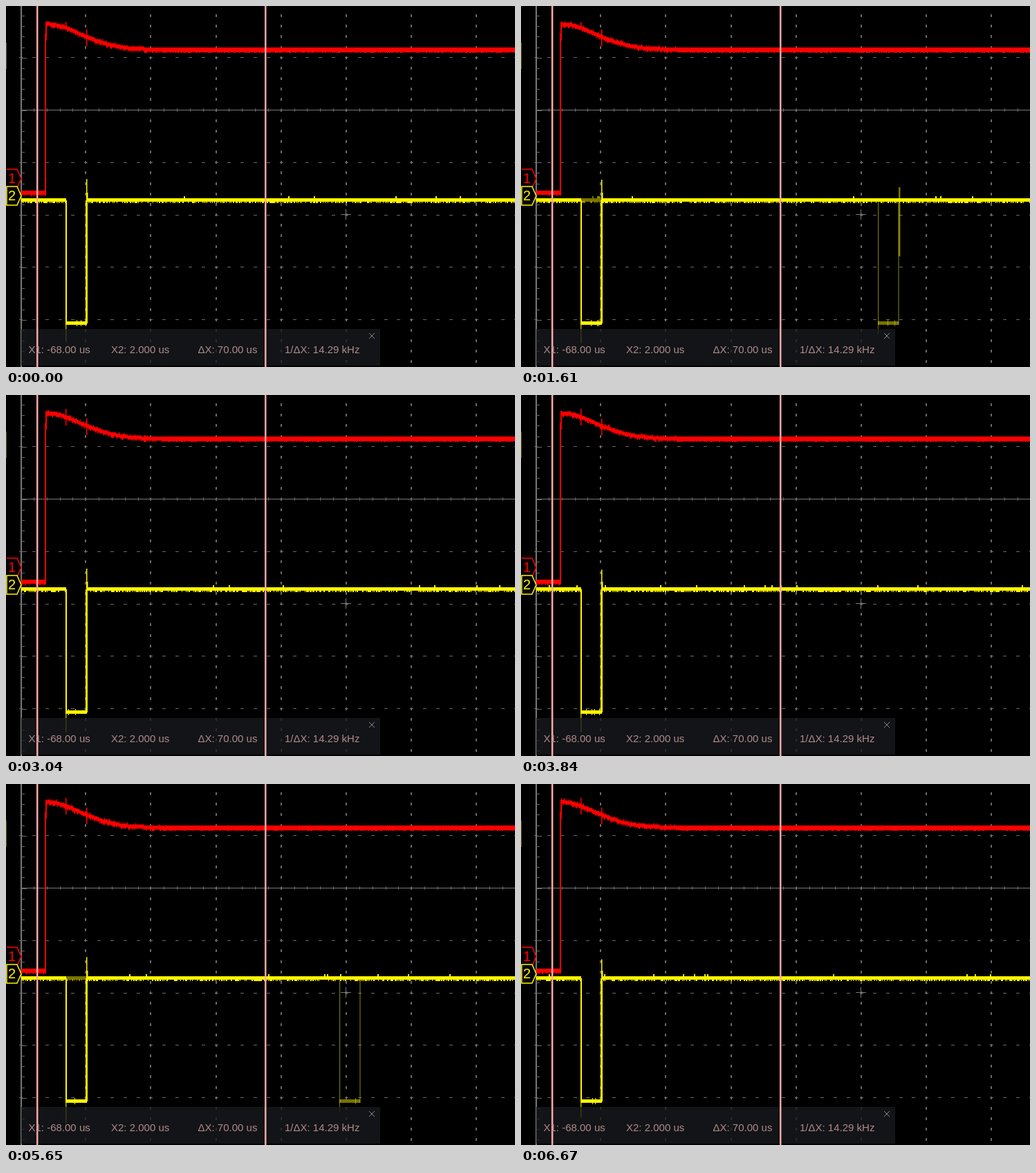
Write an HTML page with a canvas that moves like this. It is 736 px wide and 522 px high and loops after 6870 ms.

```html
<!DOCTYPE html>
<html>
<head>
<meta charset="utf-8">
<style>
  html, body { margin: 0; width: 100%; height: 100%; overflow: hidden; background: #000; }
  canvas { display: block; }
</style>
</head>
<body>
<canvas id="scope" width="736" height="522"></canvas>
<script>
const ctx = document.getElementById('scope').getContext('2d');
const W = 736, H = 522, LOOP = 6870, STEPS = 34;
const RED = '#ff0000', YELLOW = '#fff500', GRID = '#686868';
const LEFT = 22, DIV_X = 94.2, MID_Y = 150.5, DIV_Y = 75.8;

// Stray triggers: first step, left edge, width and optional overshoot
const strays = [
  { at: 5, x: 516, w: 30, spike: true },
  { at: 9, x: 115, w: 29 },
  { at: 24, x: 482, w: 30 }
];
const STRAY_LIFE = 5;

function noise(x, step, salt) {
  const v = Math.sin(x * 12.9898 + step * 78.233 + salt * 37.719) * 43758.5453;
  return v - Math.floor(v);
}

function box(x, y, w, h, color) {
  if (color) ctx.fillStyle = color;
  ctx.fillRect(x, y, w, h);
}

function drawGrid() {
  for (let i = 1; i < 8; i++) {
    const x = Math.round(LEFT - 1 + i * DIV_X);
    for (let k = -9; k < 25; k++) {
      const y = Math.round(MID_Y + k * DIV_Y / 5);
      box(x - 1, y - 2, 2, 4, GRID);
    }
  }
  for (let j = -1; j < 5; j++) {
    const y = Math.round(MID_Y + j * DIV_Y - .5);
    if (j === 0) box(LEFT, y, W, 1, '#777');
    for (let k = 0; k < 39; k++) {
      const x = Math.round(LEFT - 1 + k * DIV_X / 5);
      if (j === 0) box(x, y - 2, 1, 5, GRID);
      else box(x - 2, y, 5, 1, GRID);
    }
  }
  box(LEFT - 1, 0, 2, H, '#777');
  for (let k = -9; k < 25; k++) {
    box(LEFT, Math.round(MID_Y + k * DIV_Y / 5), k % 5 ? 5 : 8, 1, GRID);
  }
  box(484, 301, 15, 1, '#777');
  box(491, 294, 1, 15, '#777');
}

function drawRed(step) {
  ctx.fillStyle = RED;
  for (let x = LEFT; x < 57; x++) box(x, 267, 1, noise(x, step, 1) < .25 ? 8 : 6);
  box(56, 40, 2, 234);
  box(57, 23, 2, 27);
  for (let x = 58; x < W; x++) {
    const drop = 37 * Math.exp(-.693 * Math.pow(Math.max(0, x - 62) / 55, 1.8));
    const y = Math.round((63 - drop + noise(x >> 2, step, 2) * .8) / 1.5) * 1.5;
    const flat = x > 225;
    const top = flat ? 60 : y - 3;
    box(x, top, 1, flat ? 7 : 6);
    if (noise(x, step, 3) < .3) box(x, top + 5, 1, 3);
    if (!flat && noise(x, step, 4) < .12) box(x, top - 2, 1, 2);
  }
  const tall = noise(87, step, 5) > .35;
  box(86, tall ? 20 : 23, 1.5, tall ? 24 : 10);
  box(116, 34, 1.5, 24);
}

function baseline(from, to, step) {
  ctx.fillStyle = YELLOW;
  for (let x = from; x < to; x++) {
    box(x, 278, 1, 5);
    if (noise(x, step, 6) < .42) box(x, 282, 1, 3);
    if (noise(x, step, 7) < .012) box(x, 275, 2, 3);
  }
}

function pulse(x, w, line, step) {
  ctx.fillStyle = YELLOW;
  box(x, 281, line, 180);
  box(x + w - line / 2, 281, line, 180);
  box(x, 456, w, 5);
  for (let i = 3; i < w; i++) {
    if (noise(x + i, step, 8) < .07) box(x + i, 454, 1, 9);
  }
}

function drawYellow(step) {
  baseline(LEFT, 87, step);
  baseline(117, W, step);
  for (const s of strays) {
    const age = step - s.at;
    if (age < 0 || age >= STRAY_LIFE) continue;
    ctx.globalAlpha = age < 2 ? 1 : .47;
    baseline(87, 117, step);
    pulse(s.x, s.w, 1.2, step);
    box(s.x, 461, 1, 14);
    if (s.spike) box(s.x + s.w, 262, 2.5, 100);
    ctx.globalAlpha = 1;
  }
  pulse(86, 30, 2, step);
  box(116, 281, 2, 178);
  const top = 248 + noise(1, step, 9) * 6;
  box(116, top, 1.5, 282 - top);
  box(117, 270, 1.5, 12);
  ctx.globalAlpha = .7;
  box(86, 460, 1.5, 21 + noise(2, step, 9) * 11);
  ctx.globalAlpha = 1;
}

function tag(label, y, color) {
  ctx.beginPath();
  ctx.moveTo(1, y);
  ctx.lineTo(16, y);
  ctx.lineTo(22, y + 13.5);
  ctx.lineTo(16, y + 27);
  ctx.lineTo(1, y + 27);
  if (label === '2') ctx.closePath();
  ctx.fillStyle = '#000';
  ctx.fill();
  ctx.strokeStyle = color;
  ctx.lineWidth = 1.5;
  ctx.stroke();
  ctx.fillStyle = color;
  ctx.font = '20px "Liberation Sans", Arial, sans-serif';
  ctx.fillText(label, 3, y + 20);
}

function drawPanel() {
  box(LEFT, 467, 519, 53, 'rgba(24,26,30,.78)');
  box(44, 0, 2.5, H, '#ffa6a6');
  box(374, 0, 2.5, H, '#ffa6a6');
  ctx.fillStyle = '#b08a8a';
  ctx.font = '15px "Liberation Sans", Arial, sans-serif';
  ctx.fillText('X1: -68.00 us', 32.5, 502);
  ctx.fillText('X2: 2.000 us', 152, 502);
  ctx.fillText('ΔX: 70.00 us', 277.5, 502);
  ctx.fillText('1/ΔX: 14.29 kHz', 403, 502);
  ctx.strokeStyle = '#8a8a8a';
  ctx.lineWidth = 1;
  ctx.beginPath();
  ctx.moveTo(525, 473);
  ctx.lineTo(533, 481);
  ctx.moveTo(533, 473);
  ctx.lineTo(525, 481);
  ctx.stroke();
}

function draw(step) {
  box(0, 0, W, H, '#000');
  drawGrid();
  box(0, 53, 1, 38, step ? '#5c5a00' : '#555');
  drawRed(step);
  drawYellow(step);
  tag('1', 236, RED);
  tag('2', 261, YELLOW);
  drawPanel();
}

let shown = -1;
function tick() {
  const t = performance.now() % LOOP;
  const step = Math.min(STEPS - 1, Math.floor((t + 10) * STEPS / LOOP));
  if (step !== shown) draw(shown = step);
  requestAnimationFrame(tick);
}
tick();
</script>
</body>
</html>
```
